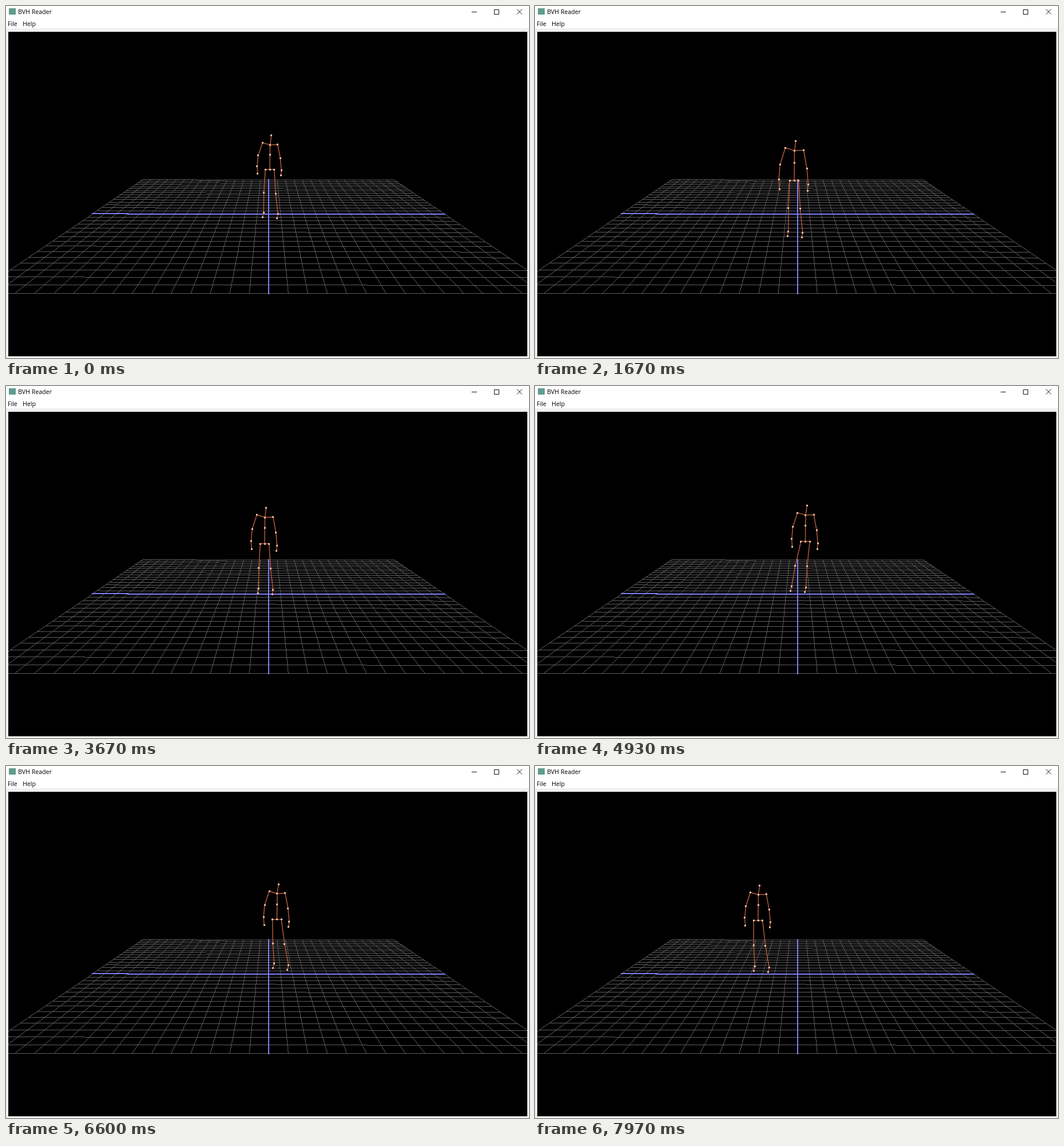
An HTML page with a canvas for the animation above (8000 ms loop, 912 px wide and 614 px high).

```html
<!DOCTYPE html>
<html lang="en">
<head>
<meta charset="utf-8">
<title>BVH Reader</title>
<style>
  html, body { margin: 0; width: 100%; height: 100%; overflow: hidden; background: #f0f0f0; }
  canvas { position: absolute; left: 0; top: 0; }
  header { position: absolute; left: 0; top: 0; width: 912px; height: 39px; background: #fff; }
  header span { position: absolute; font: 10.6px/14px "Open Sans", sans-serif; color: #000; white-space: pre; }
  header svg { position: absolute; left: 0; top: 0; }
</style>
</head>
<body>
<canvas id="scene" width="912" height="614"></canvas>
<canvas id="figure" width="912" height="614"></canvas>
<header>
  <svg width="912" height="39" fill="none" stroke="#111">
    <rect x="5" y="4" width="12" height="11" fill="#5f9c90" stroke="none"/>
    <path d="M812 10.5h9M851.5 6.5h8v8h-8z"/>
    <path d="M891 5.5l9 9M900 5.5l-9 9"/>
  </svg>
  <span style="left:21px;top:3px">BVH Reader</span>
  <span style="left:3px;top:24px">File</span>
  <span style="left:29px;top:24px">Help</span>
</header>
<script>
const LOOP = 8000, STEP = 100 / 3, FIRST = 70;
const scene = document.getElementById('scene').getContext('2d');
const ctx = document.getElementById('figure').getContext('2d');

// Ground plane in perspective, GRID cells out from each axis.
const GRID = 15, DEPTH = 37.6, TILT = 0.03;
function project(x, z) {
  const scale = DEPTH / (DEPTH - z);
  return [458.3 + 20.47 * x * scale, 153.86 + 209 * scale + x * TILT];
}

// Hard-edged line, stepped along its longer direction.
function pixelLine([x1, y1], [x2, y2], size) {
  const steps = Math.ceil(Math.max(Math.abs(x2 - x1), Math.abs(y2 - y1)));
  const snap = v => Math.floor(v - (size - 1) / 2);
  for (let i = 0; i <= steps; i++) {
    const k = i / steps;
    scene.fillRect(snap(mix(x1, x2, k)), snap(mix(y1, y2, k)), size, size);
  }
}

function drawScene() {
  scene.beginPath();
  scene.rect(4, 45, 905, 566);
  scene.clip();
  scene.fillStyle = '#000';
  scene.fillRect(0, 0, 912, 614);
  const drawPair = (i, size) => {
    pixelLine(project(i, -GRID), project(i, GRID), size);
    pixelLine(project(-GRID, i), project(GRID, i), size);
  };
  scene.fillStyle = '#5c5c5c';
  for (let i = -GRID; i <= GRID; i++) drawPair(i, 1);
  scene.fillStyle = '#7f7ff5';
  drawPair(0, 2);
}

// Stances: time, hip x, hip y, foot y, size, foot shift,
// then the sideways swing and lift of the arc to the next stance.
const stances = [
  [0, 460, 285, 369.5, 0.94, 0, -19, 37],
  [1670, 452, 304, 402.5, 1.14, 0.5, -31, 18],
  [3670, 451, 275, 362.5, 1.01, 0.5, -9, 0],
  [4930, 472.5, 271, 358.5, 1.01, -13.5, 4, 13],
  [6070, 504.5, 280.5, 361, 1, 15.5, 0, 20],
  [7170, 434, 296, 362.5, 0.99, -5.5, 0, 5],
  [7970, 389, 269.5, 358.5, 0.99, 5, 0, 0]
];

// Arm joints relative to the neck: shoulder, elbow, wrist, hand.
const leftArm = [[-14, -4], [-22, 20], [-24, 41], [-23, 55]];
const rightArm = [[14, -0.5], [19, 26], [21, 49], [20, 58]];

const mix = (a, b, k) => a + (b - a) * k;
const between = (a, b, k) => a.map((v, i) => mix(v, b[i], k));

function stanceAt(t) {
  let i = 0;
  while (i < stances.length - 2 && t >= stances[i + 1][0]) i++;
  const from = stances[i], to = stances[i + 1];
  const k = Math.min(1, (t - from[0]) / (to[0] - from[0]));
  const [, x, hipY, footY, size, shift] = between(from, to, k);
  const arc = Math.sin(Math.PI * k), lift = from[7] * arc;
  return { x: x + from[6] * arc, hipY: hipY - lift, footY: footY - lift * 0.4, size, shift };
}

function poseAt(t) {
  const { x, hipY, footY, size, shift } = stanceAt(t);
  const hips = [x, hipY];
  const neck = [x + 0.5, hipY - 45.5 * size];
  const head = [neck[0] + 2.3, neck[1] - 16.3];
  const chest = between(neck, hips, 0.41);
  const arm = joints => joints.map(([dx, dy]) => [neck[0] + dx * size, neck[1] + dy * size ** 1.5]);
  const leg = side => {
    const hip = [x + side * 7.7, hipY];
    const toe = [x + shift + side * 12.5, footY + side * 1.3];
    const ankle = [toe[0] + 1.7, toe[1] - 8];
    const knee = between(hip, ankle, 0.54);
    knee[0] -= 1;
    return [hips, hip, knee, ankle, toe];
  };
  return [
    [head, neck, chest, hips],
    [neck, ...arm(leftArm)],
    [neck, ...arm(rightArm)],
    leg(-1),
    leg(1)
  ];
}

function drawFigure(t) {
  const chains = poseAt(t);
  ctx.clearRect(0, 0, 912, 614);
  ctx.strokeStyle = '#ad593a';
  ctx.lineWidth = 1.5;
  for (const chain of chains) {
    ctx.beginPath();
    for (const [x, y] of chain) ctx.lineTo(x, y);
    ctx.stroke();
  }
  ctx.fillStyle = '#e8b9a0';
  for (const [x, y] of chains.flat()) {
    ctx.fillRect(Math.round(x - 1.5), Math.round(y - 1.5), 3, 3);
  }
}

const start = performance.now();
function tick() {
  const t = (performance.now() - start) % LOOP;
  drawFigure(t < FIRST ? 0 : FIRST + Math.floor((t - FIRST) / STEP + 0.01) * STEP);
  requestAnimationFrame(tick);
}

drawScene();
tick();
</script>
</body>
</html>
```
